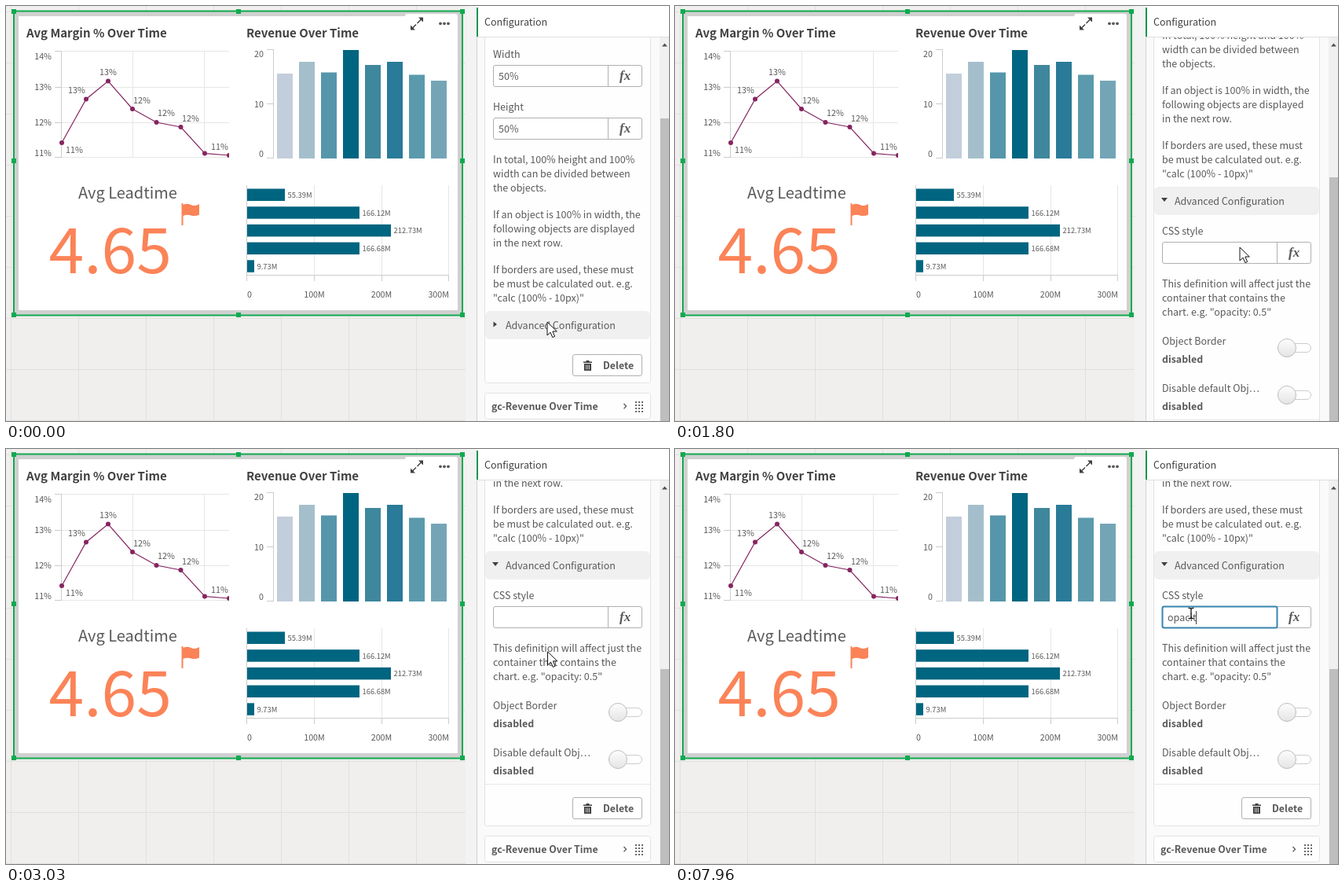
Animation of 844x528 px, one loop 8000 ms. Source, as an HTML page:

```html
<!DOCTYPE html>
<html lang="en">
<head>
<meta charset="utf-8">
<title>Dashboard configuration</title>
<style>
html, body { margin: 0; width: 100%; height: 100%; overflow: hidden; background: #f1efee; }
svg { display: block; width: 844px; height: 528px; }
text { font-family: 'Noto Sans CJK JP', 'Noto Sans CJK SC', 'Noto Sans CJK KR', 'Noto Sans', sans-serif; fill: #595959; white-space: pre; }
.body { font-size: 12.53px; }
.small { font-size: 10.74px; }
.tiny { font-size: 9.4px; }
.bold { font-size: 12.37px; font-weight: bold; }
.title { font-size: 15px; font-weight: bold; fill: #404040; }
.fx { font: italic bold 17px 'Liberation Serif', serif; }
</style>
</head>
<body>
<svg id="stage" viewBox="0 0 844 528"></svg>
<script>
const LOOP = 8000, GROWTH = 258;
const TEAL = '#006580', PLUM = '#852560', CORAL = '#fb8358', GREEN = '#10aa50';

const rect = (x, y, w, h, fill, extra = '') =>
  `<rect x="${x}" y="${y}" width="${w}" height="${h}" fill="${fill}" ${extra}/>`;
const path = (d, stroke, extra = '') => `<path d="${d}" fill="none" stroke="${stroke}" ${extra}/>`;
const shape = (d, fill, extra = '') => `<path d="${d}" fill="${fill}" ${extra}/>`;
const dot = (x, y, r, fill, extra = '') => `<circle cx="${x}" cy="${y}" r="${r}" fill="${fill}" ${extra}/>`;
const text = (x, y, s, cls = 'body', extra = '') => `<text x="${x}" y="${y}" class="${cls}" ${extra}>${s}</text>`;
const lines = (x, y, rows) => rows.map((s, i) => text(x, y + i * 18, s)).join('');
const END = 'text-anchor="end"', MID = 'text-anchor="middle"';

function canvasGrid() {
  let d = '';
  for (let x = 6.5; x < 590; x += 86) d += `M${x} 0V528`;
  for (let y = 7.5; y < 528; y += 65) d += `M0 ${y}H585`;
  return rect(0, 0, 585, 528, '#f1efee') + rect(585, 0, 14, 528, '#f3f3f3') + path(d, '#e2e0df');
}

function frameBox() {
  let s = rect(11, 7, 570, 387, '#d0d0d0') + rect(16, 13, 559, 374, '#fff') +
    rect(508, 10, 67, 8, '#fff', 'rx="3"') +
    rect(10, 6.5, 571, 387, 'none', `stroke="${GREEN}" stroke-width="2"`);
  for (const x of [10, 296, 581])
    for (const y of [7, 197, 393])
      if (x !== 296 || y !== 197) s += rect(x - 3, y - 3, 6, 6, GREEN);
  for (const x of [553, 558, 563]) s += dot(x, 22.3, 1.9, '#595959');
  return s + shape('M525 14.5h6v6zM515 24.5v6h6z', '#404040') +
    path('M529 16.500l-5.500 5.500M517 28.500l5-5', '#404040', 'stroke-width="1.500"');
}

function lineChart() {
  const pts = [[71, 174], [102, 118.5], [130, 95.5], [161, 131], [191.5, 148], [222.5, 154], [253, 187.5], [284, 190]];
  const labels = [[76, 187, 11], [79, 111, 13], [119, 88, 13], [162, 124, 12], [193, 140, 12], [224, 147, 12], [261, 183, 11]];
  const ticks = [[14, 57.5, 68], [13, 103.5, 107], [12, 148.5, 152], [11, 192.5, 191]];
  let s = text(26, 40, 'Avg Margin % Over Time', 'title');
  s += path('M70 57.500H284M70 103.500H284M70 148.500H284M70 192.500H284M161.500 57V192M252.500 57V192', '#e6e6e6');
  s += path('M70.500 57V193' + ticks.map(t => `M62 ${t[1]}h8`).join(''), '#ccc');
  for (const [v, , y] of ticks) s += text(58, y, v + '%', 'small', END);
  s += '<g clip-path="url(#plot)">' + path('M' + pts.join('L'), PLUM, 'stroke-width="1.200"') +
    pts.map(p => dot(p[0], p[1], 3, PLUM)).join('') + '</g>';
  return s + labels.map(([x, y, v]) => text(x, y, v + '%', 'small')).join('');
}

function barChart() {
  const tops = [86, 71, 84.5, 56, 75, 71, 87.5, 95];
  const fills = ['#c3cedc', '#a4bfcb', '#5696ab', TEAL, '#3f879c', '#2a7a99', '#5b9aad', '#74a5b6'];
  let s = text(306, 40, 'Revenue Over Time', 'title') +
    path('M340.500 55V194M332 55.500h8M332 124.500h8M332 193.500h8', '#ccc');
  [[20, 65], [10, 129], [0, 192]].forEach(([v, y]) => s += text(328, y, v, 'small', END));
  tops.forEach((y, i) => s += rect(345 + i * 28, y, 20, 194 - y, fills[i]));
  return s;
}

function kpi() {
  return text(92, 245, 'Avg Leadtime', 'body', 'style="font-size:20px"') +
    text(54.5, 340, '4.65', 'body', `style="font-size:80.5px;fill:${CORAL}"`) +
    shape('M223.500 251h2v2q5-2.500 10 0t10.500-1v13.500q-5 2.500-10.500 1t-10 .5v12h-2z', CORAL);
}

function rowChart() {
  const rows = [[355, '55.39M'], [450, '166.12M'], [490, '212.73M'], [450, '166.68M'], [316, '9.73M']];
  let s = path('M392.500 228V342M478.500 228V342M563.500 228V342', '#e6e6e6') +
    path('M306.500 228V350M306 342.500H564M392.500 342v8M478.500 342v8M563.500 342v8', '#ccc');
  rows.forEach(([x, label], i) => {
    const y = 232.5 + i * 22.7;
    s += rect(307, y, x - 307, 15.5, TEAL) + text(x + 3.5, y + 11.5, label, 'tiny');
  });
  return s + text(310, 371, '0', 'small', MID) + text(392.5, 371, '100M', 'small', MID) +
    text(478, 371, '200M', 'small', MID) + text(564, 371, '300M', 'small', END);
}

// Field frame with its expression button; y is the vertical centre.
function field(y, value) {
  return rect(620.5, y - 13.5, 189, 27, '#fff', 'rx="2.500" stroke="#b0b0b0"') +
    path(`M766.500 ${y - 13.5}v27`, '#b0b0b0') + text(627, y + 5, value) +
    text(781, y + 4.5, 'fx', 'fx');
}

function toggle(y) {
  return rect(768.5, y - 5.5, 41, 11, '#fff', 'rx="5.500" stroke="#ccc"') +
    dot(779, y, 11.5, 'url(#knob)', 'stroke="#bdbdbd"');
}

function upperItems() {
  return text(620, 66, 'Width') + field(89, '50%') + text(620, 133, 'Height') + field(156, '50%') +
    lines(620, 200, ['In total, 100% height and 100%', 'width can be divided between', 'the objects.']) +
    lines(620, 270, ['If an object is 100% in width, the', 'following objects are displayed', 'in the next row.']) +
    lines(620, 340, ['If borders are used, these must', 'be must be calculated out. e.g.', '"calc (100% - 10px)"']) +
    rect(610, 388, 210, 36, '#f0f0f0', 'rx="6"') +
    '<path id="arrow" fill="#404040"/>' + text(636, 411, 'Advanced Configuration');
}

function advancedItems() {
  return text(620, 449, 'CSS style') + field(472, '') +
    '<rect id="focus" x="620.500" y="458.500" width="146" height="27" rx="2" fill="none"/>' +
    '<text id="typed" class="body" x="627" y="477"></text>' +
    '<path id="caret" stroke="#404040"/>' +
    lines(620, 516, ['This definition will affect just the', 'container that contains the', 'chart. e.g. "opacity: 0.5"']) +
    text(620, 589, 'Object Border') + text(620, 612, 'disabled', 'bold') + toggle(593) +
    text(620, 649, 'Disable default Obj…') + text(620, 672, 'disabled', 'bold') + toggle(653);
}

function lowerItems() {
  let s = path('M610 426.500H820', '#e6e6e6', 'id="rule"') +
    rect(721.5, 443.5, 88, 27, '#fff', 'rx="2.500" stroke="#b0b0b0"') +
    text(760, 462, 'Delete', 'bold') +
    shape('M735 452.500h3.500v-1.500h4v1.500h3.500v1.500h-11zM736 455h9v9h-9z', '#404040') +
    path('M738.500 456.500v6M740.500 456.500v6M742.500 456.500v6', '#fff', 'stroke-width=".7"') +
    rect(609.5, 492.5, 211, 33, '#fefefe', 'rx="3" stroke="#e3e3e3"') +
    text(618, 514, 'gc-Revenue Over Time', 'bold') +
    path('M786.500 506l3 3.200-3 3.200', '#595959', 'stroke-width="1.300"');
  for (let i = 0; i < 12; i++)
    s += rect(801 + i % 3 * 4, 503 + Math.floor(i / 3) * 4, 2, 2, '#6a6a6a');
  return s;
}

const stage = document.getElementById('stage');
stage.innerHTML = `
<defs>
  <clipPath id="plot"><rect x="66" y="50" width="218" height="150"/></clipPath>
  <clipPath id="panel"><rect x="600" y="40" width="232" height="488"/></clipPath>
  <clipPath id="fold"><rect id="foldBox" x="605" y="424" width="220" height="0"/></clipPath>
  <linearGradient id="knob" x2="0" y2="1"><stop stop-color="#fdfdfd"/><stop offset="1" stop-color="#e4e4e4"/></linearGradient>
</defs>` +
  canvasGrid() + frameBox() + lineChart() + barChart() + kpi() + rowChart() +
  rect(599, 0, 245, 528, '#fafafa') + path('M599.500 40V528', '#d2d2d2') +
  '<g clip-path="url(#panel)"><g id="scroll">' +
  '<rect id="card" x="609.500" y="-60" width="211" rx="3" fill="#fefefe" stroke="#e3e3e3"/>' +
  upperItems() + `<g clip-path="url(#fold)">${advancedItems()}</g>` +
  `<g id="lower">${lowerItems()}</g></g></g>` +
  rect(832, 40, 12, 488, '#f0f0f0') + rect(833, 0, 11, 600, '#bebebe', 'id="thumb"') +
  shape('M835 51.500l3.500-4 3.500 4z', '#505050') +
  rect(599, 0, 245, 39, '#fff') + path('M599 39.500H844', '#dedede') + rect(599, 2, 2, 37, '#12964c') +
  text(609, 25, 'Configuration', 'body', 'style="fill:#404040"') +
  `<g id="pointer">
    ${shape('M0 0V17L4 13.200L6.800 19.600L9.600 18.400L6.900 12H12.300Z', '#fff', 'id="plain" stroke="#111" stroke-linejoin="round"')}
    ${shape('M-1.500 1.500Q0-.5 1.500 1.500V8Q4 6.500 5 8.500Q7.500 7.500 8.200 9.500Q10.500 9 10.500 12V16Q10 19 8.500 21.500H-1Q-3 18-6 13.500Q-6 10.500-3.500 12L-1.500 14Z', '#fff', 'id="hand" stroke="#111" stroke-linejoin="round"')}
    ${path('M-3.500-6.500Q-.5-7 0-5.500Q.5-7 3.500-6.500M0-5.500V5.500M-3.500 6.500Q-.5 7 0 5.500Q.5 7 3.500 6.500', '#111', 'id="beam" stroke-width="1.300"')}
  </g>`;

const el = {};
for (const node of stage.querySelectorAll('[id]')) el[node.id] = node;
const set = (id, name, value) => el[id].setAttribute(name, value);
const show = (id, on) => set(id, 'visibility', on ? 'visible' : 'hidden');

const KEYS = [6660, 6860, 7100, 7460, 7760, 7960];
const STOPS = ['opacit'].flatMap(w => [...Array(w.length + 1).keys()].map(n => w.slice(0, n)));
const BLINKS = [3930, 4460, 5000, 5530, 6030, 6560, 6660];

const span = (t, a, b) => Math.min(1, Math.max(0, (t - a) / (b - a)));
const ease = (t, a, b) => (1 - Math.cos(Math.PI * span(t, a, b))) / 2;
const count = (list, t) => list.filter(v => v <= t).length;

function pointerAt(q) {
  const away = ease(q, 990, 1300), back = ease(q, 2700, 3366), nudge = span(q, 4700, 4800);
  return [689 + 30 * away - 59 * back - 3 * nudge, 402 - 95 * away - 98 * back];
}

function draw(t) {
  const q = Math.floor((t + 6.7) * 0.03) / 0.03;
  const grow = GROWTH * ease(q, 870, 1067);
  const scroll = 258 * ease(q, 1100, 1400) - 100 * ease(q, 1606, 1796) + 100 * ease(q, 2073, 2263);

  set('scroll', 'transform', `translate(0 ${-scroll})`);
  set('lower', 'transform', `translate(0 ${grow})`);
  set('foldBox', 'height', grow);
  set('card', 'height', 539.5 + grow);
  set('thumb', 'y', 143 - 23 * grow / GROWTH + 0.62 * scroll);
  set('arrow', 'd', grow > 0 ? 'M619 402h8l-4 5z' : 'M620.500 401.500l4.500 3.500-4.500 3.500z');
  show('rule', grow > 0);

  const [x, y] = pointerAt(q);
  const overField = t > 2700 && y < 229, overHeader = t >= 660 && t < 1200 && y > 388;
  set('pointer', 'transform', `translate(${x.toFixed(1)} ${y.toFixed(1)})`);
  show('beam', overField);
  show('hand', overHeader);
  show('plain', !overField && !overHeader);

  const focused = t >= 3930;
  set('focus', 'stroke', focused ? '#3785ad' : overField ? '#8c8c8c' : 'none');
  set('focus', 'stroke-width', focused ? 2 : 1);
  const word = STOPS[count(KEYS, t)];
  if (el.typed.textContent !== word) el.typed.textContent = word;
  const caretX = Math.floor(627 + (word ? el.typed.getComputedTextLength() : 0)) + 0.5;
  set('caret', 'd', `M${caretX} 464V481`);
  show('caret', count(BLINKS, t) % 2 === 1);
}

const start = performance.now();
function tick() {
  draw((performance.now() - start) % LOOP);
  requestAnimationFrame(tick);
}
tick();
</script>
</body>
</html>
```
